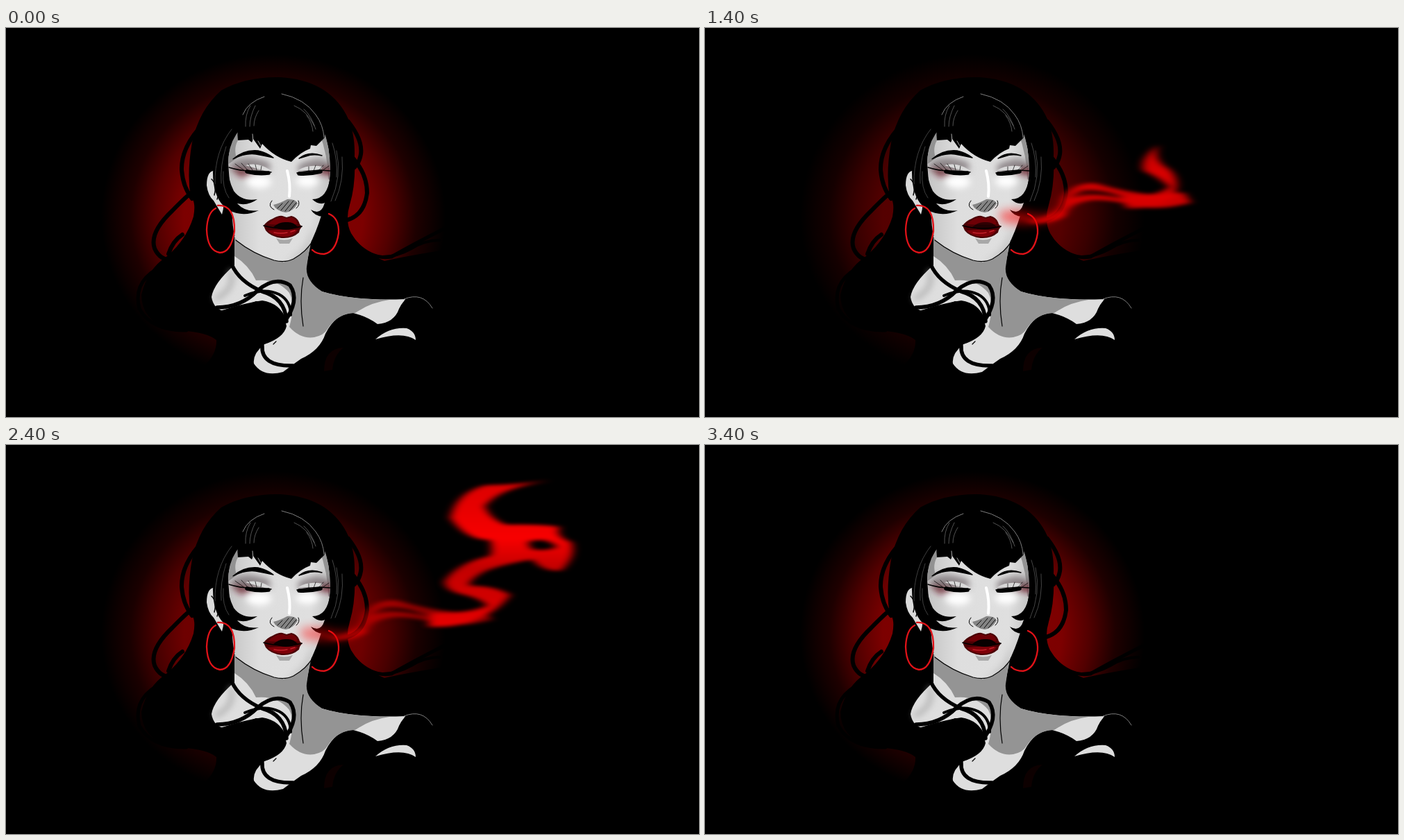
Animation of 998x561 px, one loop 3.6 s. Source, as an HTML page:

```html
<!DOCTYPE html>
<html lang="en">
<head>
<meta charset="utf-8">
<title>Red smoke</title>
<style>
html, body { margin: 0; width: 100%; height: 100%; overflow: hidden; background: #000; }
svg { display: block; width: 100vw; height: 100vh; }
.line { fill: none; stroke: #000; stroke-linecap: round; stroke-linejoin: round; }
.shine { fill: none; stroke: #8c8c8c; stroke-width: .9; stroke-linecap: round; }
.ring { fill: none; stroke: #e01218; stroke-width: 2.3; stroke-linecap: round; }
</style>
</head>
<body>
<svg viewBox="0 0 998 561">
  <defs>
    <radialGradient id="halo">
      <stop offset="0" stop-color="#880000"/>
      <stop offset=".52" stop-color="#7c0000"/>
      <stop offset=".68" stop-color="#520000"/>
      <stop offset=".83" stop-color="#1e0000"/>
      <stop offset="1" stop-color="#000"/>
    </radialGradient>
    <linearGradient id="skin" x1="0" x2="1">
      <stop offset="0" stop-color="#c4c4c4"/>
      <stop offset=".3" stop-color="#dedede"/>
      <stop offset=".8" stop-color="#dfdfdf"/>
      <stop offset="1" stop-color="#c4c4c4"/>
    </linearGradient>
    <linearGradient id="rising" gradientUnits="userSpaceOnUse" x1="0" y1="56" x2="0" y2="262">
      <stop offset="0" stop-color="#400000"/>
      <stop offset=".25" stop-color="#8c0000"/>
      <stop offset=".5" stop-color="#d80000"/>
      <stop offset=".75" stop-color="#ff0000"/>
      <stop offset="1" stop-color="#d00000"/>
    </linearGradient>
    <linearGradient id="full" gradientUnits="userSpaceOnUse" x1="0" y1="50" x2="0" y2="262">
      <stop offset="0" stop-color="#e00000"/>
      <stop offset=".4" stop-color="#ff0000"/>
      <stop offset=".6" stop-color="#c80000"/>
      <stop offset="1" stop-color="#e80000"/>
    </linearGradient>
    <linearGradient id="fading" gradientUnits="userSpaceOnUse" x1="0" y1="50" x2="0" y2="262">
      <stop offset="0" stop-color="#d00000"/>
      <stop offset=".4" stop-color="#ff0000"/>
      <stop offset=".65" stop-color="#b80000"/>
      <stop offset="1" stop-color="#a00000"/>
    </linearGradient>
    <filter id="soft" x="-60%" y="-60%" width="220%" height="220%"><feGaussianBlur stdDeviation="5"/></filter>
    <filter id="softer" x="-80%" y="-80%" width="260%" height="260%"><feGaussianBlur stdDeviation="7"/></filter>
    <filter id="streak" filterUnits="userSpaceOnUse" x="420" y="20" width="450" height="300"><feGaussianBlur stdDeviation="6.5 2.4"/></filter>
    <filter id="mist" filterUnits="userSpaceOnUse" x="400" y="180" width="280" height="130"><feGaussianBlur stdDeviation="4 2.5"/></filter>
    <clipPath id="faceClip"><use href="#face"/></clipPath>
  </defs>

  <rect width="998" height="561"/>
  <ellipse id="glow" cx="385" cy="272" rx="248" ry="234" fill="url(#halo)"/>

  <!-- hair mass -->
  <path d="M395 71Q345 70 310 90Q278 118 268 165Q260 210 266 244Q274 250 270 272Q260 305 232 329Q203 348 195 385Q195 420 235 436Q285 436 303 450Q304 470 285 488V561H660V316Q590 326 545 336Q512 322 497 296Q488 278 495 255Q504 225 502 185Q503 150 490 125Q463 75 395 71Z"/>
  <g class="line" stroke-width="6">
    <path d="M278 145Q252 175 253 205Q255 230 268 246"/>
    <path d="M285 222Q262 240 240 263Q206 295 214 318Q222 336 242 335"/>
    <path d="M254 298Q240 307 234 326"/>
    <path d="M493 135Q514 162 511 182Q508 200 494 206"/>
    <path d="M500 188Q520 211 520 238Q516 270 491 277"/>
    <path d="M500 306Q526 335 555 330Q590 310 630 290" stroke-width="5"/>
    <path d="M520 326Q550 337 584 318Q603 306 624 306" stroke-width="4"/>
    <path d="M240 337Q180 358 192 405Q210 437 260 436" stroke-width="5"/>
  </g>
  <path d="M458 495Q458 462 486 461Q472 472 470 493Z" fill="#0d0000"/>

  <!-- neck and shoulders -->
  <path d="M329 300V342Q299 368 296 388Q299 407 318 409L360 394Q399 397 404 430Q400 447 372 456Q355 470 357 484Q370 504 399 496Q412 486 425 477Q452 465 460 441Q475 411 500 411Q520 416 535 427Q559 425 566 405L575 391Q500 394 455 380Q431 366 432 345L440 305Z" fill="#dedede"/>
  <path d="M329 301V329Q350 342 360 364Q391 361 408 382Q417 400 408 431Q424 449 444 446Q458 443 463 434Q478 411 503 411Q524 396 552 392Q490 391 455 380Q431 364 433 345L438 310L400 338Z" fill="#949494"/>
  <path d="M324 350Q331 377 301 391" fill="none" stroke="#b4b4b4" stroke-width="7" filter="url(#soft)"/>
  <path class="line" d="M428 360Q422 393 428 430M385 456L389 452" stroke-width="1.2"/>
  <path d="M300 411Q340 397 369 393Q395 397 403 420Q404 445 372 456Q340 480 315 465Z"/>
  <g class="line" stroke-width="5.5">
    <path d="M325 341Q336 366 369 380Q402 389 404 423"/>
    <path d="M304 403Q338 403 362 379Q387 357 409 371Q424 393 400 425"/>
    <path d="M344 386Q372 374 393 384Q410 393 410 414" stroke-width="4"/>
    <path d="M369 458Q367 488 413 487"/>
  </g>
  <circle cx="590" cy="413" r="25"/>
  <path d="M532 449Q552 431 577 433Q590 438 590 450Q572 437 532 449Z" fill="#dedede"/>
  <path class="shine" d="M573 391Q600 380 614 404"/>

  <!-- ear -->
  <path d="M300 206Q289 206 289 227Q291 242 299 249L311 269Q317 248 310 224Z" fill="#dadada"/>
  <path class="line" d="M296 218Q304 225 300 241M301 213Q311 229 304 247" stroke="#555" stroke-width="1.5"/>

  <!-- face -->
  <path id="face" d="M342 128Q321 158 320 195L326 275Q327 296 332 307Q354 324 386 335Q401 339 414 333Q434 320 441 305Q458 268 466 219Q469 180 458 148L400 165Z" fill="url(#skin)"/>
  <g clip-path="url(#faceClip)">
    <path d="M337 120Q316 160 318 198L332 188Q325 165 345 150Z" fill="#929292"/>
    <path d="M451 150L475 150V226L464 218Q464 185 451 150Z" fill="#939393"/>
    <g filter="url(#soft)">
      <path d="M325 195Q346 180 379 194L382 205L326 207ZM420 199Q445 182 467 195V208H421Z" fill="#6e6669" opacity=".7"/>
      <path d="M322 201L363 207L338 215ZM441 207L470 199V214Z" fill="#6b1424" opacity=".85"/>
    </g>
    <g fill="#fff" filter="url(#soft)">
      <ellipse cx="364" cy="222" rx="18" ry="9"/>
      <ellipse cx="434" cy="221" rx="16" ry="8"/>
    </g>
    <path d="M440 280Q436 318 402 337L445 330Z" fill="#aaa" opacity=".4" filter="url(#soft)"/>
  </g>
  <path class="line" d="M331 306Q356 326 386 335Q402 339 414 333Q433 322 441 308" stroke-width="1.2"/>

  <!-- brows, eyes, nose -->
  <path d="M327 189Q343 175 363 177Q376 180 385 187Q371 184 360 182Q344 180 327 189ZM422 188Q436 177 455 184Q442 181 432 185L422 188Z" stroke="#000" stroke-width="1.4" stroke-linejoin="round"/>
  <path d="M345 198Q363 193 381 205L380 207Q363 204 345 198ZM421 205Q435 196 456 200L453 205Z" fill="#d8d8d8"/>
  <g class="line">
    <path d="M321 201Q340 207 357 206Q370 206 382 208M419 209Q434 206 452 205L467 206" stroke-width="1.4"/>
    <path d="M347 207Q363 211 378 209M422 210Q437 211 453 207" stroke-width="5.5"/>
    <path d="M344 206L330 196M349 206L339 195M355 205L349 196M361 205L359 197M367 205L368 199M436 206L436 200M443 206L446 198M450 206L457 198M455 206L465 199" stroke-width=".7"/>
  </g>
  <path d="M405 206Q410 225 408 243" fill="none" stroke="#fff" stroke-width="4" stroke-linecap="round"/>
  <path d="M385 255Q394 253 405 247Q417 246 420 253Q414 264 403 266Q389 264 385 255Z" fill="#858585"/>
  <path class="line" d="M391 260L398 253M396 263L407 250M402 264L414 249M408 264L418 252" stroke="#555" stroke-width=".9"/>
  <path class="line" d="M383 249Q376 257 386 262M421 249Q424 255 418 260" stroke="#333" stroke-width="1"/>

  <!-- lips -->
  <path d="M389 303Q400 308 413 303L408 311H394Z" fill="#909090" opacity=".7"/>
  <path d="M371 285Q376 278 384 275Q393 270 398 271L404 273L411 271Q419 273 422 280Q423 285 427 286Q423 289 422 295Q412 304 397 303Q381 301 374 292Z" fill="#4a0004"/>
  <path d="M377 283Q389 272 398 273L404 275L411 273Q418 275 420 283Q400 284 377 283Z" fill="#6e0006"/>
  <path d="M377 292Q398 290 420 291Q415 301 399 301Q382 299 377 292Z" fill="#7e0008"/>
  <path class="line" d="M371 285Q385 289 400 289T426 286" stroke-width="1.6"/>
  <path id="gap" d="M385 287Q394 279 404 280Q414 279 420 287Q404 295 385 287Z" fill="#080000"/>
  <path d="M386 295Q396 297 405 295M410 294L416 292" fill="none" stroke="#c0202a" stroke-width="1.4" stroke-linecap="round"/>

  <!-- fringe and side locks -->
  <path d="M397 94Q354 98 337 128Q332 145 334 162L349 161L354 165L356 160L366 174L369 167Q387 187 411 193Q424 179 438 174L439 169L447 170L459 158Q460 132 439 108Q421 94 397 94Z"/>
  <path d="M338 133Q302 160 298 208Q298 248 320 262Q341 274 364 263Q344 266 333 253Q348 257 362 247Q340 251 328 235Q317 214 320 185Q324 160 338 145Z"/>
  <path d="M456 145Q470 177 467 214Q463 247 441 247Q451 256 459 252Q454 271 439 262Q447 275 464 271Q488 263 498 200L486 135Z"/>
  <g class="shine">
    <path d="M372 99Q348 107 341 125M397 95Q430 102 446 125Q457 140 458 158"/>
    <path d="M352 112Q344 125 345 142M359 112Q351 128 351 142M364 119Q357 130 357 141M415 112Q433 119 444 141M429 117Q440 127 446 146M433 126Q441 137 442 149" opacity=".65"/>
    <path d="M325 146Q300 178 301 225M317 171Q308 199 310 224M313 207Q311 231 321 245" opacity=".5"/>
    <path d="M476 177Q484 214 468 250M484 186Q487 221 474 249M470 166Q478 190 476 215" opacity=".55"/>
    <path d="M363 163L367 170M355 153L356 164" stroke="#bbb"/>
  </g>

  <!-- earrings -->
  <path class="ring" d="M305 256Q330 255 329 293Q324 324 308 324Q290 321 289 291Q290 266 302 260"/>
  <path class="ring" d="M465 268Q480 274 479 296Q475 323 458 326Q447 326 441 320"/>

  <!-- smoke -->
  <g id="breath">
    <path d="M423 266Q445 258 472 268Q502 270 520 262L500 277Q470 287 428 280Z" fill="#f00" opacity=".75" filter="url(#softer)"/>
    <path d="M444 270Q480 280 510 264L521 270Q490 282 460 277Z" fill="#f00" opacity=".5" filter="url(#mist)"/>
  </g>
  <g id="wisp" fill="none" stroke="#e80000" stroke-width="6" stroke-linecap="round" filter="url(#mist)">
    <path d="M478 272Q519 262 512 244Q514 232 555 230M500 252Q525 238 554 238M490 268Q515 279 522 266"/>
  </g>
  <g filter="url(#streak)">
    <path id="trail" fill="#e00000" d="M466 278Q510 274 514 246Q530 222 563 224Q605 237 650 241L690 237L700 252Q655 264 620 257Q590 248 560 248Q525 252 520 268Q509 281 470 282ZM523 246Q560 234 610 248Q574 231 543 234Z" fill-rule="evenodd"/>
    <path id="plume" fill-rule="evenodd"/>
  </g>
</svg>
<script>
const $ = id => document.getElementById(id);
const STEP = 200, LOOP = 3600;

const plumes = [
  { fill: 'none', d: '' },
  { fill: 'url(#rising)', d: 'M600 243Q650 244 668 229Q655 216 632 206Q624 190 653 168Q644 190 668 203Q688 221 674 245Q650 262 606 260Z' },
  { fill: 'url(#rising)', d: 'M630 245Q670 243 682 234Q666 216 635 210Q618 208 612 200Q640 178 690 165Q706 154 697 139Q650 130 640 105Q650 75 690 63Q720 56 746 59Q700 63 680 85Q672 105 705 117Q750 116 772 122Q756 135 774 140Q740 160 720 172Q690 180 664 193Q700 202 746 207Q748 234 712 248Q670 262 622 261ZM760 168Q780 168 799 164Q790 183 768 180Z' },
  { fill: 'url(#full)', d: 'M612 242Q665 244 692 232Q688 223 660 216Q630 210 632 196Q650 170 697 160Q702 150 697 137Q662 137 640 105Q648 69 690 58Q740 57 784 51Q710 62 690 88Q695 105 720 115Q770 114 797 118Q790 132 814 140Q822 160 800 181Q772 183 758 165Q715 172 690 182Q665 195 668 203Q705 203 726 216Q710 240 670 255Q640 264 608 262ZM752 140Q777 131 793 147Q778 154 756 150Z' },
  { fill: 'url(#fading)', d: 'M612 246Q660 247 690 234Q690 222 664 214Q634 206 642 193Q664 173 704 160Q709 149 702 137Q670 135 648 102Q656 71 693 60Q730 54 764 55Q708 62 684 91Q692 107 723 116Q772 114 800 119Q794 131 817 143Q825 161 798 184Q768 188 756 167Q722 173 696 183Q672 193 670 200Q718 204 746 212Q738 236 692 250Q658 261 610 262Q650 250 680 245Q645 252 612 246ZM752 143Q777 134 792 148Q774 156 754 151Z' },
  { fill: 'url(#fading)', d: 'M605 243Q655 245 690 230Q690 222 665 215Q632 208 637 190Q655 175 700 162Q715 146 706 135Q660 130 630 100Q645 72 690 62Q715 56 734 58Q690 68 680 92Q700 118 728 122Q730 140 728 152Q745 157 762 159Q740 168 715 175Q690 182 670 196Q700 205 723 207Q720 225 713 238Q675 255 625 262L605 260Q650 248 680 240Q645 249 605 243Z' }
];

// glow, breath, wisp, lip gap, plume index, plume opacity, trail opacity
const steps = [
  [1, 0, 0, 1, 0, 0, 0], [.96, 0, 0, 1, 0, 0, 0], [.9, 0, 0, 1, 0, 0, 0],
  [.83, .1, 0, .8, 0, 0, 0], [.75, .5, .3, .5, 0, 0, 0], [.66, 1, .85, .25, 0, 0, 0],
  [.66, .9, 0, .4, 1, .6, .8], [.68, .7, 0, .6, 1, .85, .9], [.7, .5, 0, .8, 1, 1, .9],
  [.74, .4, 0, 1, 2, 1, .95], [.78, .6, 0, 1, 2, 1, .9], [.82, .85, 0, 1, 3, 1, .95],
  [.88, .6, 0, 1, 3, .97, .6], [.94, .35, 0, 1, 4, .95, .3], [.95, .6, 0, .8, 4, .7, .1],
  [.95, .9, 0, .6, 5, .55, 0], [.97, .4, 0, .8, 5, .25, 0], [1, 0, 0, 1, 0, 0, 0]
];

const fade = (id, v) => $(id).setAttribute('opacity', v);

function show(i) {
  const [glow, breath, wisp, gap, shape, plume, trail] = steps[i];
  fade('glow', glow);
  fade('breath', breath);
  fade('wisp', wisp);
  fade('gap', gap);
  fade('trail', trail);
  fade('plume', plume);
  $('plume').setAttribute('d', plumes[shape].d);
  $('plume').setAttribute('fill', plumes[shape].fill);
}

const start = performance.now();
let last = -1;
function tick() {
  const i = Math.floor(((performance.now() - start) % LOOP) / STEP);
  if (i !== last) show(last = i);
  requestAnimationFrame(tick);
}
tick();
</script>
</body>
</html>
```
